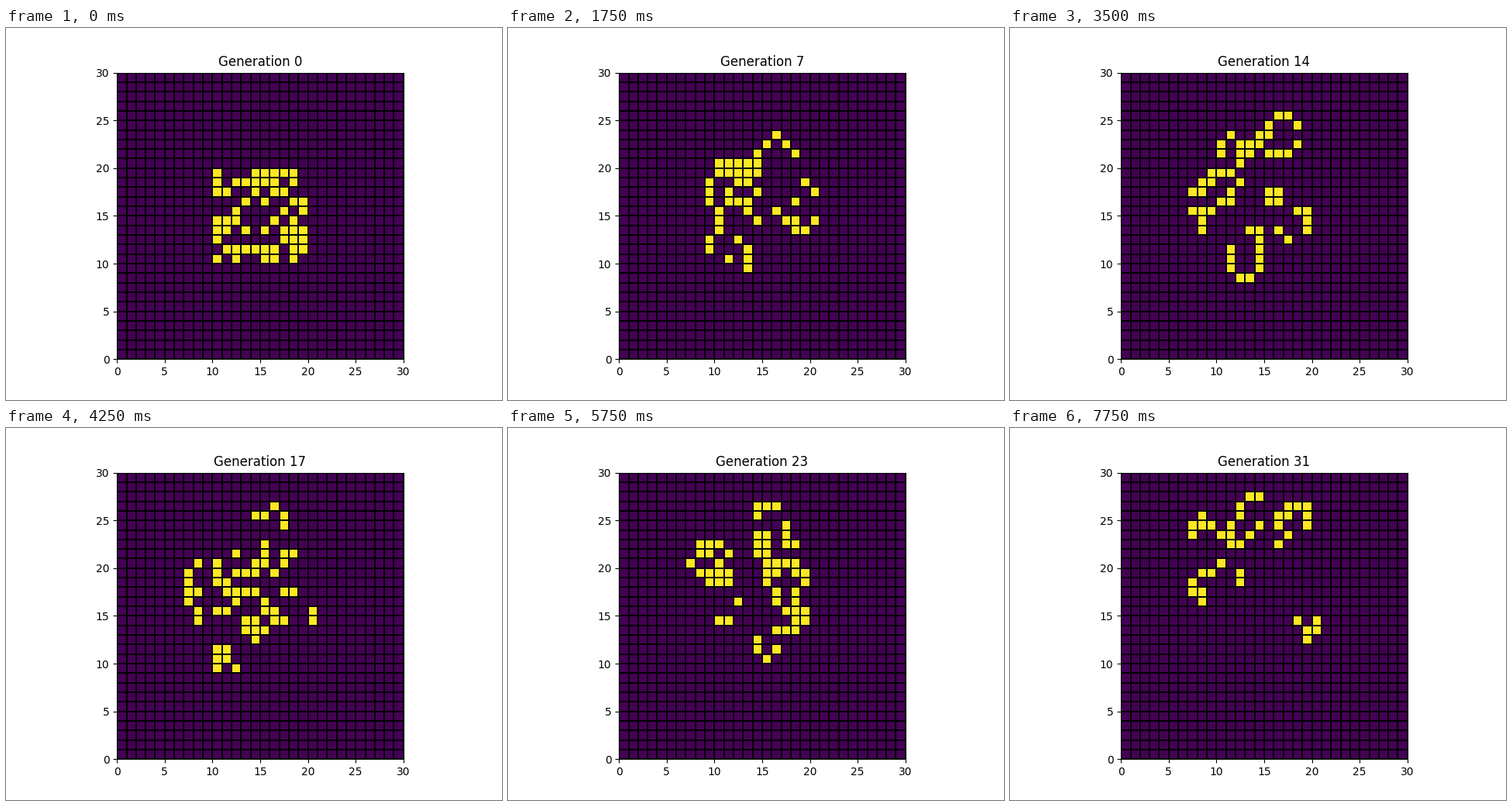
Animation of 640x480 px, one loop 8 s. Source, as a matplotlib script:

```python
import matplotlib.pyplot as plt
import numpy as np
from matplotlib.animation import FuncAnimation

SIZE = 30
GENERATIONS = 32
INTERVAL = 250
CORNER = 10

# Starting colony, drawn as it appears; everything later follows from the rule.
COLONY = """
O...OOOOO.
O.OOOOO.O.
OO..O.OO..
...O.O..OO
..O....O.O
OOO...O.O.
OO.O.O.OOO
O......OOO
.OOOOOO.OO
O.O..OO.O.
""".split()


def first_grid():
    grid = np.zeros((SIZE, SIZE), dtype=int)
    for y, row in enumerate(reversed(COLONY), CORNER):
        for x, cell in enumerate(row, CORNER):
            grid[y, x] = cell == "O"
    return grid


def evolve(grid):
    """One step of the Game of Life on a wrapped board."""
    shifts = [(dy, dx) for dy in (-1, 0, 1) for dx in (-1, 0, 1) if dy or dx]
    neighbours = sum(np.roll(grid, s, axis=(0, 1)) for s in shifts)
    return ((neighbours == 3) | ((grid == 1) & (neighbours == 2))).astype(int)


history = [first_grid()]
while len(history) < GENERATIONS:
    history.append(evolve(history[-1]))

fig, ax = plt.subplots(figsize=(6.4, 4.8), dpi=100)
mesh = ax.pcolormesh(history[0], cmap="viridis", vmin=0, vmax=1,
                     edgecolors="k", linewidth=0.25)
ax.set_aspect("equal")
title = ax.set_title("Generation 0")


def update(n):
    mesh.set_array(history[n])
    title.set_text(f"Generation {n}")
    return mesh, title


anim = FuncAnimation(fig, update, frames=GENERATIONS, interval=INTERVAL,
                     repeat=True, repeat_delay=0, blit=False)
plt.show()
```
